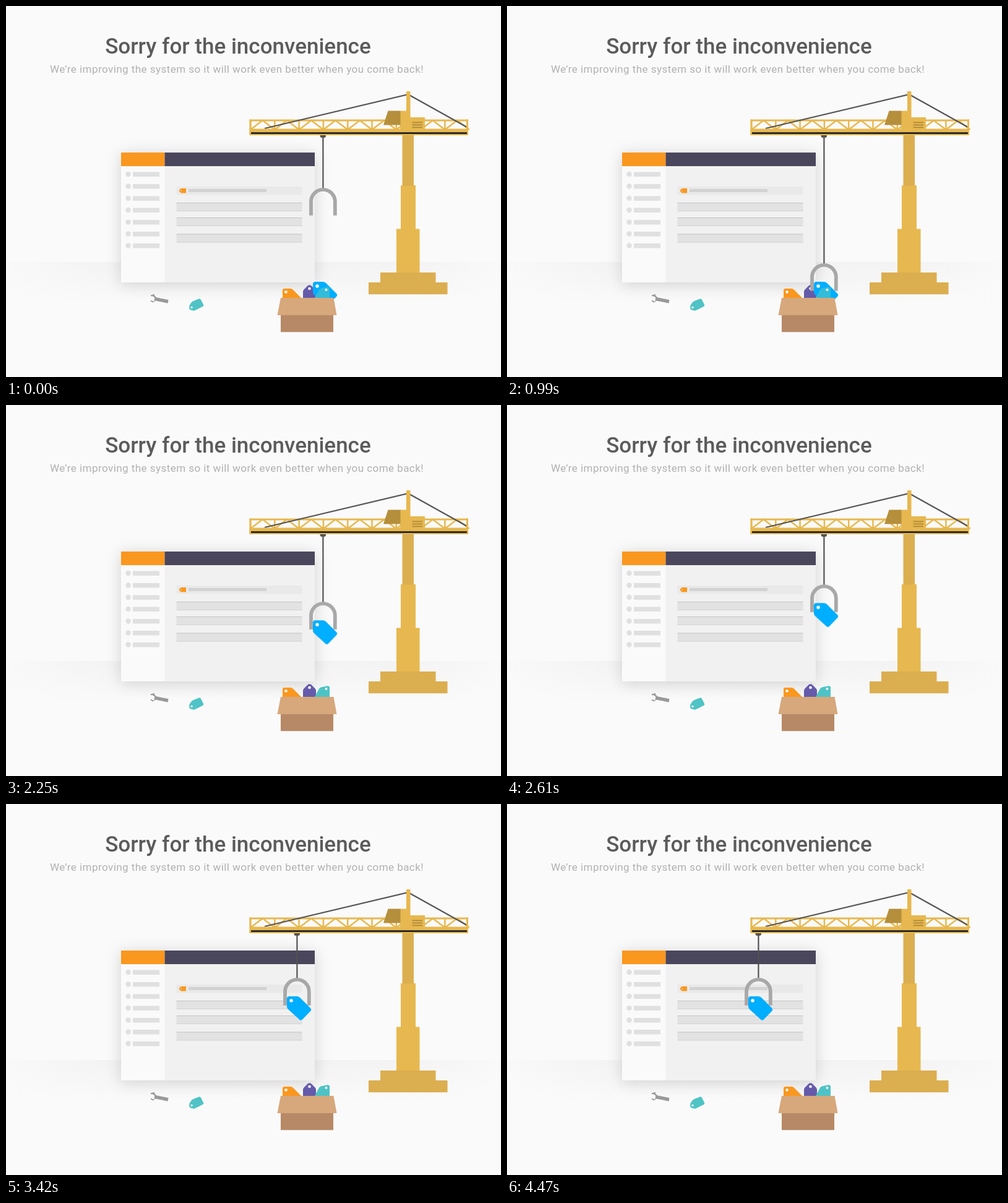
These frames come from a looping animation (800 by 600 pixels, 4840 ms). An HTML page:

```html
<!DOCTYPE html>
<html lang="en">
<head>
<meta charset="utf-8">
<title>Sorry for the inconvenience</title>
<style>
  html, body { margin: 0; width: 100%; height: 100%; overflow: hidden; background: #fafafa; }
  svg { display: block; width: 800px; height: 600px; }
  text { font-family: Roboto, sans-serif; text-anchor: middle; }
  .title { font-size: 35px; font-weight: 500; fill: #5b5b5b; }
  .note { font-size: 17px; letter-spacing: .45px; fill: #b1b1b1; }
  .main { fill: #e7b84f; }
  .shade { fill: #dbae50; }
  .hole { fill: #fafafa; }
  .orange { fill: #fa971e; }
  .teal { fill: #4fc3c5; }

  /* lower 0-990 ms, lift to 2730 ms, travel to 4470 ms, rest to 4840 ms */
  .trolley, .hook, .load { animation: 4840ms linear -1ms infinite; }
  .trolley { animation-name: travel; }
  .hook { animation-name: hoist; }
  .load { animation-name: lift; }
  @keyframes travel {
    0%, 56.405% { transform: translateX(0); animation-timing-function: steps(58); }
    92.3554%, 100% { transform: translateX(-106px); }
  }
  @keyframes hoist {
    0% { transform: translateY(0); animation-timing-function: steps(33); }
    20.4545% { transform: translateY(122px); animation-timing-function: steps(58); }
    56.405%, 100% { transform: translateY(-13px); }
  }
  @keyframes lift {
    0%, 20.4545% { transform: translateY(122px); animation-timing-function: steps(58); }
    56.405%, 100% { transform: translateY(-13px); }
  }
</style>
</head>
<body>
<svg viewBox="0 0 800 600">
  <defs>
    <linearGradient id="ground" x2="0" y2="1">
      <stop stop-color="#f3f3f3"/>
      <stop offset="1" stop-color="#fafafa"/>
    </linearGradient>
    <linearGradient id="sides">
      <stop stop-color="#fafafa" stop-opacity=".8"/>
      <stop offset=".2" stop-color="#fafafa" stop-opacity="0"/>
      <stop offset=".8" stop-color="#fafafa" stop-opacity="0"/>
      <stop offset="1" stop-color="#fafafa" stop-opacity=".8"/>
    </linearGradient>
    <filter id="shadow" x="-20%" y="-20%" width="140%" height="140%">
      <feDropShadow dx="0" dy="3" stdDeviation="12" flood-color="#000" flood-opacity=".16"/>
    </filter>
    <clipPath id="below"><path d="M0 206H800V600H0Z"/></clipPath>
    <path id="tealTag" d="M498 474L506 459Q507 457 509.500 456.500L519 454.500Q523 454 523 457V474Z"/>
  </defs>

  <rect width="800" height="600" fill="#fafafa"/>
  <rect y="414" width="800" height="68" fill="url(#ground)"/>
  <rect y="414" width="800" height="68" fill="url(#sides)"/>

  <text class="title" x="375" y="77">Sorry for the inconvenience</text>
  <text class="note" x="373" y="108">We’re improving the system so it will work even better when you come back!</text>

  <!-- window -->
  <rect x="186" y="237" width="313" height="210" fill="#f1f1f1" filter="url(#shadow)"/>
  <rect x="186" y="259" width="70.500" height="188" fill="#fafafa"/>
  <rect class="orange" x="186" y="237" width="70.500" height="22"/>
  <rect x="256.500" y="237" width="242.500" height="22" fill="#4a465c"/>
  <g id="menu" fill="#e0e0e0"></g>
  <rect x="275.500" y="292" width="203" height="13.500" fill="#e9e9e9"/>
  <path class="orange" d="M283 295H291V302.500H283L280 300V297.500Z"/>
  <circle class="hole" cx="283" cy="298.700" r=".8"/>
  <rect x="295" y="296" width="126" height="5" fill="#d2d2d2"/>
  <g id="rows"></g>

  <!-- loose tools -->
  <path d="M240 473.500L262 478" stroke="#999" stroke-width="5.500" fill="none"/>
  <path d="M235 468.500A5.300 5.300 0 1 1 235.500 478L240 477L241.500 473L239 470.500Z" fill="#999"/>
  <path d="M234 468.500L240 467M234 476.500L238 479" stroke="#999" stroke-width="2"/>
  <path class="teal" d="M296.500 484L300 479Q301 478 303 477L312 473.500Q314 473 315 475L319 483Q320 485 318 486L306 492Q304 493 302 492.500L298 491.500Q296 491 296 488Z"/>
  <circle class="hole" cx="300" cy="487.500" r="1.700"/>

  <!-- tags in the box -->
  <path class="orange" d="M447 474V460Q447 457 450 457H460Q462 457 463.500 458.500L479 474Z"/>
  <circle class="hole" cx="452.500" cy="462.500" r="2.300"/>
  <path d="M480 474V462Q480 460 481.500 458.500L487.500 452.500Q490.500 450 493.500 452.500L499.500 458.500Q501 460 501 462V474Z" fill="#655baa"/>
  <circle class="hole" cx="490.500" cy="457" r="2.300"/>
  <use href="#tealTag" class="teal"/>

  <g clip-path="url(#below)">
    <g class="trolley">
      <path d="M507.500 206H517V210Q517 213 514 213H510.500Q507.500 213 507.500 210Z" fill="#555"/>
      <g class="hook" fill="none">
        <path d="M512.400 80V296" stroke="#525252" stroke-width="2.200"/>
        <path d="M493 338.800V316.300A19.400 19.400 0 0 1 531.800 316.300V338.800" stroke="#a8a8a8" stroke-width="5.800"/>
      </g>
      <g class="load">
        <path d="M500 324H512Q515 324 517 326L534 343Q536.500 345.500 534 348L521 361.500Q518.500 364 516 361.500L498 345Q496 343 496 340.500V328Q496 324 500 324Z" fill="#00aeff"/>
        <circle class="hole" cx="503" cy="331" r="2.800"/>
      </g>
    </g>
  </g>

  <use href="#tealTag" class="teal" opacity=".65"/>
  <circle class="hole" cx="517.500" cy="459" r="2"/>
  <path d="M444 472H529.500L534.500 500H438.500Z" fill="#d6a87c"/>
  <rect x="444" y="500" width="85" height="27.300" fill="#b78966"/>

  <!-- crane -->
  <g fill="none" stroke="#e7b84f">
    <path d="M393.500 185H747" stroke-width="3"/>
    <path id="lattice" stroke-width="2.500"/>
  </g>
  <path d="M418 198L650 143L745 196" fill="none" stroke="#565656" stroke-width="2.200"/>
  <g class="main">
    <rect x="393.500" y="198.500" width="353.500" height="10.500"/>
    <rect x="393.500" y="183.500" width="3" height="25"/>
    <rect x="744" y="183.500" width="3" height="25"/>
    <rect x="647" y="138" width="6.500" height="45"/>
    <path d="M637 169.500H650V180H677V200H637Z"/>
    <rect x="638" y="290" width="24" height="71"/>
    <rect x="631" y="360.500" width="37.500" height="71"/>
  </g>
  <rect x="396" y="204.200" width="349" height="2.800" fill="#222"/>
  <path d="M617.500 169.500H637.500V192.500H610Z" fill="#b58f3b"/>
  <path d="M656.500 188.300H673M656.500 192.300H673M656.500 196.300H673" stroke="#ad873a" stroke-width="1.800"/>
  <g class="shade">
    <rect x="640.500" y="209" width="18.500" height="81.500"/>
    <rect x="605" y="431" width="89.500" height="16.500"/>
    <rect x="586" y="447" width="127.500" height="19.300"/>
  </g>
</svg>
<script>
  const fill = (id, items, draw) =>
    document.getElementById(id).innerHTML = items.map(draw).join('');

  fill('menu', [272, 291.5, 311, 330, 349.5, 368.5, 387.5], y =>
    `<circle cx="197.500" cy="${y}" r="4.200"/><rect x="205" y="${y - 3.5}" width="43" height="7.500"/>`);

  fill('rows', [318, 342, 368.5], y =>
    `<rect x="275.500" y="${y}" width="203" height="14" fill="#e2e2e2"/>
     <rect x="275.500" y="${y}" width="203" height="1" fill="#c5c5c5"/>
     <rect x="275.500" y="${y + 13}" width="203" height="1" fill="#d3d3d3"/>`);

  // one upright and a pair of braces per bay
  const bay = 39.3;
  let braces = '';
  for (let i = 0; i < 9; i++) {
    const x = 395 + i * bay;
    braces += `M${x} 185V200M${x} 200L${x + bay / 2} 185L${x + bay} 200`;
  }
  document.getElementById('lattice').setAttribute('d', braces);
</script>
</body>
</html>
```
